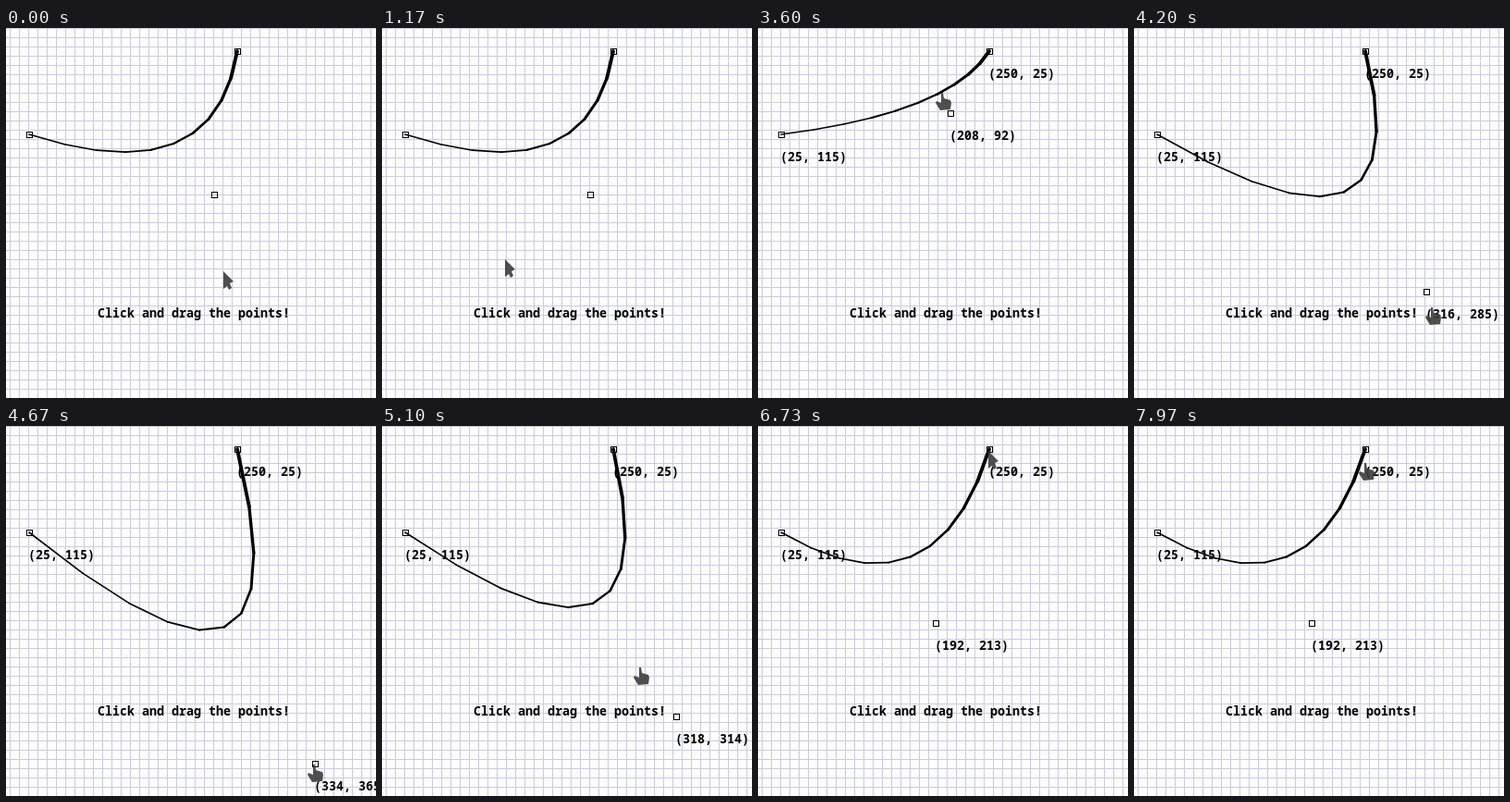
Animation of 400 by 400 pixels, one loop 8000 ms. Source, as an HTML page with a canvas:

```html
<!DOCTYPE html>
<html lang="en">
<head>
<meta charset="utf-8">
<title>Drag the points</title>
<style>
  html, body { margin: 0; width: 100%; height: 100%; overflow: hidden; background: #fdfdfd; }
  canvas { display: block; width: 400px; height: 400px; }
</style>
</head>
<body>
<canvas id="stage" width="400" height="400"></canvas>
<script>
const ctx = document.getElementById('stage').getContext('2d');
const LOOP = 8000;
const START = [25, 115];
const END = [250, 25];
const SEGMENTS = 10;
const GRAB = 1870;
const RELEASE = 6270;
const LAG = 35; // the dragged point trails the pointer by this long

// Key points as [time, x, y]
const dragPath = [
  [GRAB, 225, 180], [2120, 280, 255], [2370, 225, 179], [2700, 225, 179],
  [2770, 291, 150], [2930, 291, 150], [3300, 285, 277], [3750, 170, 0],
  [4200, 316, 285], [4350, 342, 354], [4850, 330, 371], [5100, 319, 315],
  [5290, 110, 30], [5450, 130, 0], [6000, 192, 217], [6000 + LAG, 192, 213]
];
const approachPath = [
  [30, 235, 263], [130, 279, 297], [530, 279, 297],
  [720, 387, 330], [1000, 10, 340], [1300, 226, 182]
];
const leavePath = [[RELEASE, 192, 213], [6700, 249, 26], [7100, 250, 40]];

const arrowShape = [[0, 0], [11, 11], [7, 13], [9, 18], [6, 20], [4, 16], [0, 19]];
const handShape = [
  [-1, 0], [1, 0], [2, 6], [9, 8], [10, 11], [9, 18],
  [-2, 19], [-7, 11], [-6, 9], [-1, 11]
];

function along(path, time) {
  const next = path.findIndex(key => key[0] > time);
  if (next === 0) return path[0].slice(1);
  if (next < 0) return path[path.length - 1].slice(1);
  const [t0, x0, y0] = path[next - 1];
  const [t1, x1, y1] = path[next];
  const part = (time - t0) / (t1 - t0);
  return [Math.round(x0 + (x1 - x0) * part), Math.round(y0 + (y1 - y0) * part)];
}

function pointerAt(time) {
  if (time < GRAB) return along(approachPath, time);
  if (time < RELEASE) return along(dragPath, time + LAG);
  return along(leavePath, time);
}

function drawGrid() {
  ctx.fillStyle = '#fdfdfd';
  ctx.fillRect(0, 0, 400, 400);
  ctx.fillStyle = '#cbcbdf';
  for (let i = 0; i < 400; i += 10) {
    ctx.fillRect(i + 4, 0, 1, 400);
    ctx.fillRect(0, i, 400, 1);
  }
}

function bezier(control, t) {
  const u = 1 - t;
  return [0, 1].map(i => u * u * START[i] + 2 * u * t * control[i] + t * t * END[i]);
}

function drawCurve(control) {
  ctx.strokeStyle = '#000';
  ctx.lineCap = 'round';
  for (let i = 0; i < SEGMENTS; i++) {
    ctx.lineWidth = 1.6 + 2.2 * (i / (SEGMENTS - 1)) ** 2;
    ctx.beginPath();
    ctx.moveTo(...bezier(control, i / SEGMENTS));
    ctx.lineTo(...bezier(control, (i + 1) / SEGMENTS));
    ctx.stroke();
  }
}

function drawHandle([x, y]) {
  ctx.lineWidth = 1;
  ctx.strokeRect(x - 2.5, y - 2.5, 6, 6);
}

function drawText(text, x, y) {
  ctx.font = 'bold 13.33px "Noto Sans Mono", monospace';
  ctx.fillStyle = '#000';
  ctx.fillText(text, x, y);
}

function drawPointer([x, y], shape) {
  ctx.fillStyle = 'rgba(60, 60, 60, 0.9)';
  ctx.beginPath();
  shape.forEach(([dx, dy]) => ctx.lineTo(x + dx, y + dy));
  ctx.closePath();
  ctx.fill();
}

function draw(time) {
  const control = along(dragPath, time);
  const points = [START, END, control];
  drawGrid();
  drawCurve(control);
  points.forEach(drawHandle);
  drawText('Click and drag the points!', 99, 313);
  if (time >= GRAB) {
    points.forEach(([x, y]) => drawText(`(${x}, ${y})`, x - 1, y + 29));
  }
  const isHand = (time >= 1500 && time < RELEASE) || time >= 6770;
  drawPointer(pointerAt(time), isHand ? handShape : arrowShape);
}

const began = performance.now();
function tick() {
  draw((performance.now() - began) % LOOP);
  requestAnimationFrame(tick);
}
tick();
</script>
</body>
</html>
```
